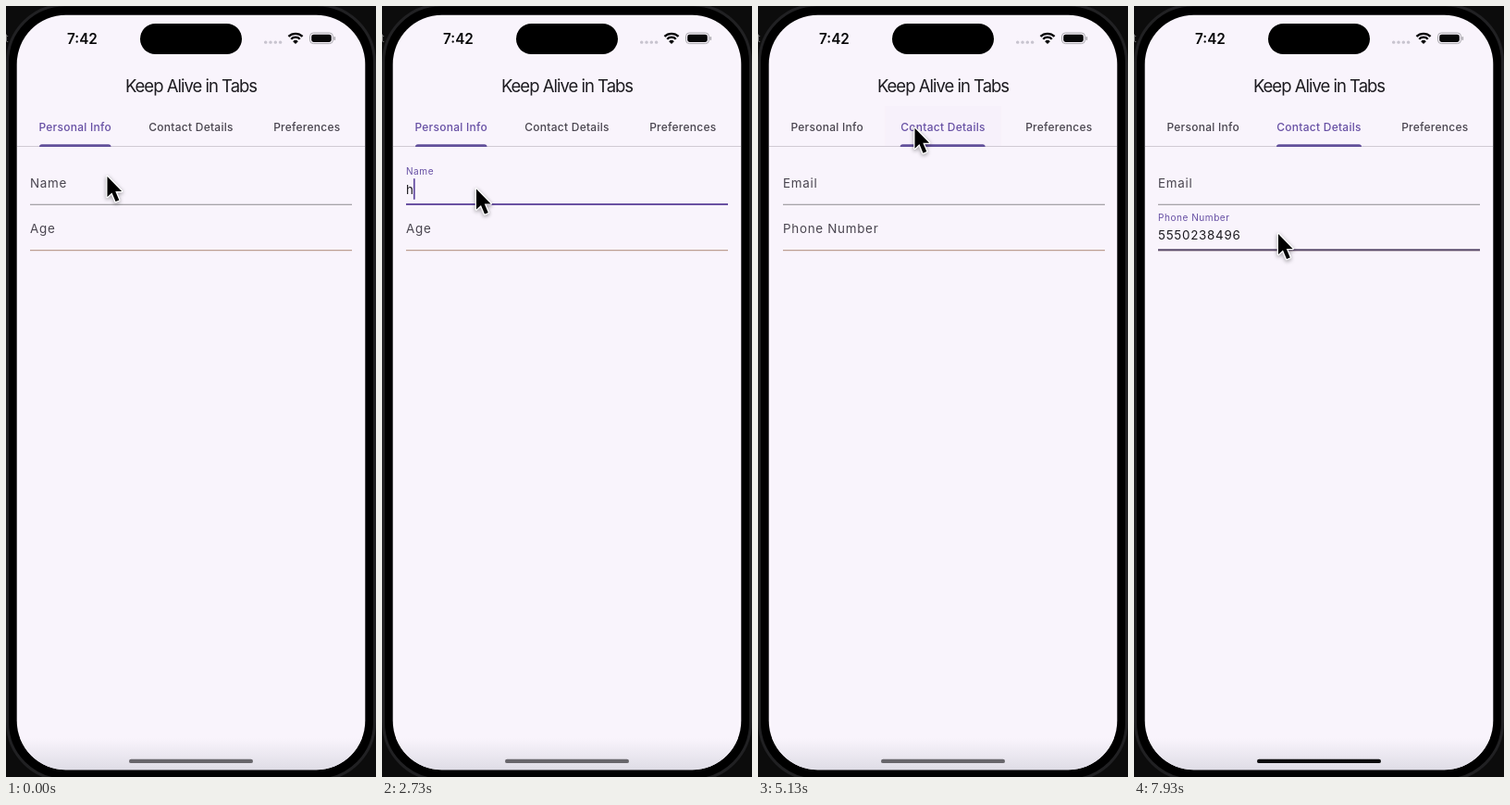
Animation, 400 px wide and 832 px high, one loop 8000 ms. Source, as an HTML page with a canvas:

```html
<!DOCTYPE html>
<html lang="en">
<head>
<meta charset="utf-8">
<title>Keep Alive in Tabs</title>
<style>
html, body { margin: 0; width: 100%; height: 100%; overflow: hidden; background: #000; }
canvas { display: block; width: 100vw; height: 100vh; }
</style>
</head>
<body>
<canvas id="stage"></canvas>
<script>
const W = 400, H = 832, LOOP = 8000;
const SCREEN = { x: 11.7, y: 9.7, w: 376.6, h: 814.6, r: 53 };
const PAPER = '#f9f4fc', INK = '#1d1b20', BLACK = '#070708', GREY = '#aaa8ae';
const MUTED = [73, 69, 79], PURPLE = [103, 80, 164];

const canvas = document.getElementById('stage');
const ctx = canvas.getContext('2d');

const clamp = v => Math.min(1, Math.max(0, v));
const mix = (a, b, p) => a + (b - a) * p;
const mixRgb = (a, b, p) => `rgb(${a.map((v, i) => Math.round(mix(v, b[i], p)))})`;
const smooth = p => p * p * (3 - 2 * p);
const ease = (t, start, length) => smooth(clamp((t - start) / length));

const typing = {
  name: { text: 'hello', focus: 950, start: 2600, step: 225 },
  phone: { text: '5550238496', focus: 6150, start: 6500, step: 89 }
};

const tabs = [
  { label: 'Personal Info', x: 74.7, left: 36, right: 113.5 },
  { label: 'Contact Details', x: 200, left: 154, right: 246 },
  { label: 'Preferences', x: 325.3, left: 289.5, right: 361.5 }
];

const pointerMoves = [
  { start: 200, length: 650, x: 102, y: 197.5 },
  { start: 3950, length: 700, x: 170, y: 127.5 },
  { start: 5080, length: 450, x: 156, y: 246 }
];

const TAP = 4740, SLIDE = 4840;

function fillBox(x, y, w, h, color, r = 0) {
  ctx.fillStyle = color;
  ctx.beginPath();
  ctx.roundRect(x, y, w, h, r);
  ctx.fill();
}

function write(text, x, y, size, color, { weight = 400, spacing = 0, align = 'left' } = {}) {
  ctx.font = `${weight} ${size}px Inter, sans-serif`;
  ctx.letterSpacing = spacing + 'px';
  ctx.textAlign = align;
  ctx.fillStyle = color;
  ctx.fillText(text, x, y);
  return ctx.measureText(text).width;
}

function drawBody() {
  fillBox(0, 0, W, H, '#0c0c0c');
  write('t', -1, 39, 11, '#777777');
  ctx.beginPath();
  ctx.roundRect(1.5, -1, 397, 836, 62);
  ctx.fillStyle = '#000';
  ctx.fill();
  ctx.strokeStyle = '#212123';
  ctx.lineWidth = 3;
  ctx.stroke();
}

function drawStatus() {
  write('7:42', 66, 41, 15.3, BLACK, { weight: 600 });
  fillBox(145, 19, 110, 33, '#000', 16.5);
  for (let i = 0; i < 4; i++) fillBox(279 + i * 5.3, 37.5, 3.4, 3.2, '#c8c4cf', 1.5);

  ctx.strokeStyle = BLACK;
  ctx.lineWidth = 2.3;
  for (const r of [6.8, 10.7]) {
    ctx.beginPath();
    ctx.arc(313, 40.5, r, -Math.PI * 0.75, -Math.PI * 0.25);
    ctx.stroke();
  }
  ctx.fillStyle = BLACK;
  ctx.beginPath();
  ctx.moveTo(313, 41);
  ctx.arc(313, 41, 4, -Math.PI * 0.75, -Math.PI * 0.25);
  ctx.fill();

  ctx.strokeStyle = GREY;
  ctx.lineWidth = 1;
  ctx.beginPath();
  ctx.roundRect(328.5, 29, 25, 11.6, 3.8);
  ctx.stroke();
  fillBox(330.2, 30.7, 21.6, 8.2, BLACK, 2.4);
  fillBox(354.5, 33, 1.6, 4, GREY, 1);
}

function drawTabs(t, slide) {
  write('Keep Alive in Tabs', 200, 93, 18.5, INK, { spacing: -1, align: 'center' });

  const grow = clamp((t - TAP) / 330);
  if (grow > 0 && t < 5250) {
    ctx.save();
    ctx.beginPath();
    ctx.rect(137.3, 108, 125.4, 43);
    ctx.clip();
    ctx.globalAlpha = 0.6 * (1 - ease(t, 4900, 330));
    ctx.fillStyle = '#e8d9ea';
    ctx.beginPath();
    ctx.arc(169, 130, mix(12, 100, Math.pow(grow, 1.3)), 0, Math.PI * 2);
    ctx.fill();
    ctx.restore();
  }

  fillBox(12, 151, 376, 1, '#d0cad4');
  const active = [1 - slide, slide, 0];
  tabs.forEach((tab, i) => {
    write(tab.label, tab.x, 134.7, 12, mixRgb(MUTED, PURPLE, active[i]),
      { weight: 500, spacing: 0.25, align: 'center' });
  });
  const left = mix(tabs[0].left, tabs[1].left, slide);
  const right = mix(tabs[0].right, tabs[1].right, slide);
  fillBox(left, 149.2, right - left, 2.8, '#62509a', [2.8, 2.8, 0, 0]);
}

function caretAlpha(t, entry) {
  const last = entry.start + entry.step * (entry.text.length - 1);
  let since = entry.focus;
  if (t >= entry.start) {
    since = Math.min(last, entry.start + Math.floor((t - entry.start) / entry.step) * entry.step);
  }
  const phase = (t - since) % 1000;
  return phase < 800 ? clamp((620 - phase) / 200) : clamp((phase - 850) / 150);
}

function drawField(t, label, row, entry, blur = Infinity) {
  const y = row * 49.2;
  const focus = entry && t >= entry.focus && t < blur;
  const lift = entry ? ease(t, entry.focus, 167) : 0;
  const tint = lift * (1 - ease(t, blur, 167));

  fillBox(26, 213.8 + y, 348, row ? 1.2 : 1, row ? '#bd9f92' : '#8c8a8e');
  if (tint > 0) {
    ctx.globalAlpha = tint;
    fillBox(26, 213 + y, 348, 2, row ? '#5b4c6c' : '#6a52a2');
    ctx.globalAlpha = 1;
  }
  const scale = mix(1, 0.75, lift);
  write(label, 26, mix(195.6, 182.3, lift) + y, 13.4 * scale,
    mixRgb(MUTED, PURPLE, tint), { spacing: 0.72 * scale });

  if (!entry) return;
  const count = t < entry.start ? 0 : Math.floor((t - entry.start) / entry.step) + 1;
  const width = write(entry.text.slice(0, count), 26, 202.5 + y, 13.4, INK, { spacing: 0.72 });
  if (focus) {
    ctx.globalAlpha = caretAlpha(t, entry);
    fillBox(26 + width - (count ? 0.7 : 0), 186 + y, 1.8, 23, '#6750a4', 0.9);
    ctx.globalAlpha = 1;
  }
}

function drawPages(t, slide) {
  ctx.save();
  ctx.translate(-SCREEN.w * slide, 0);
  if (slide < 1) {
    drawField(t, 'Name', 0, typing.name, SLIDE);
    drawField(t, 'Age', 1);
  }
  ctx.translate(SCREEN.w, 0);
  if (slide > 0) {
    drawField(t, 'Email', 0);
    drawField(t, 'Phone Number', 1, typing.phone);
  }
  ctx.restore();
}

function drawPointer(t) {
  let x = 109.5, y = 184;
  for (const move of pointerMoves) {
    const p = ease(t, move.start, move.length);
    x = mix(x, move.x, p);
    y = mix(y, move.y, p);
  }
  const shape = new Path2D('M0 0V22L5 17.4L9 27L12.8 25.4L8.8 16H15.6Z');
  ctx.save();
  ctx.translate(x, y);
  ctx.lineJoin = 'round';
  ctx.lineWidth = 2.6;
  ctx.strokeStyle = '#fff';
  ctx.shadowColor = 'rgba(0, 0, 0, 0.4)';
  ctx.shadowBlur = 4 * canvas.width / W;
  ctx.shadowOffsetY = 1.5 * canvas.height / H;
  ctx.stroke(shape);
  ctx.shadowColor = 'transparent';
  ctx.fillStyle = '#000';
  ctx.fill(shape);
  ctx.restore();
}

function draw(t) {
  const slide = ease(t, SLIDE, 300);
  ctx.setTransform(canvas.width / W, 0, 0, canvas.height / H, 0, 0);
  drawBody();

  ctx.save();
  ctx.beginPath();
  ctx.roundRect(SCREEN.x, SCREEN.y, SCREEN.w, SCREEN.h, SCREEN.r);
  ctx.clip();
  fillBox(0, 0, W, H, PAPER);
  const shade = ctx.createLinearGradient(0, 790, 0, 824);
  shade.addColorStop(0, PAPER);
  shade.addColorStop(1, '#dfdde6');
  fillBox(0, 790, W, 36, shade);
  drawStatus();
  drawTabs(t, slide);
  drawPages(t, slide);
  fillBox(133, 812.7, 134, 4.4, mixRgb([104, 102, 107], [12, 12, 13], ease(t, 6000, 200)), 2.2);
  ctx.restore();

  drawPointer(t);
}

function resize() {
  const ratio = window.devicePixelRatio || 1;
  canvas.width = Math.round(innerWidth * ratio);
  canvas.height = Math.round(innerHeight * ratio);
}

function frame() {
  draw((performance.now() - begin) % LOOP);
  requestAnimationFrame(frame);
}

addEventListener('resize', resize);
resize();
const begin = performance.now();
frame();
</script>
</body>
</html>
```
